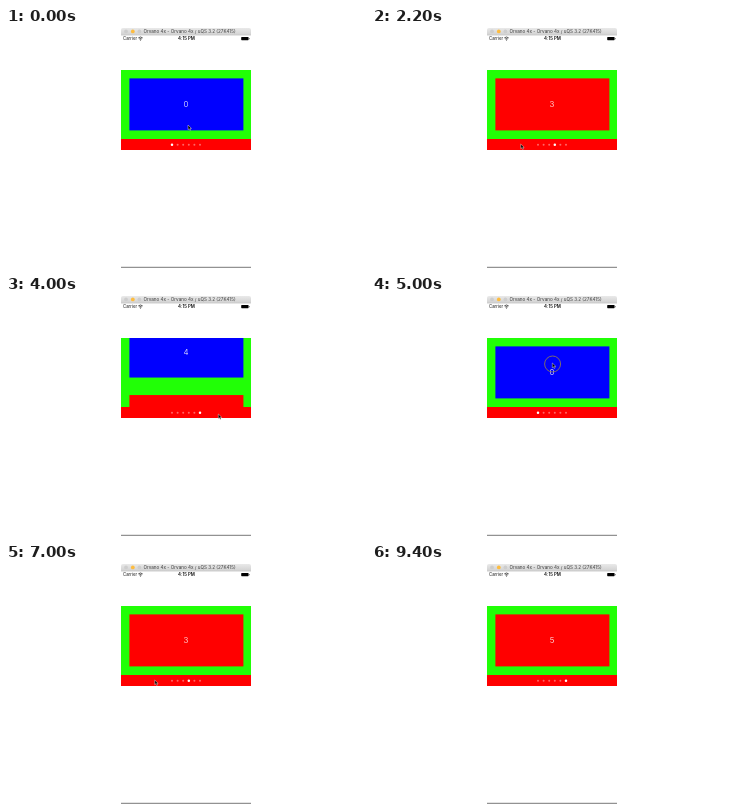
An HTML page for the animation above (9.6 s loop, 360 px wide and 240 px high).

```html
<!DOCTYPE html>
<html lang="en">
<head>
<meta charset="utf-8">
<title>Vertical pager</title>
<style>
  html, body { margin: 0; width: 100%; height: 100%; overflow: hidden; background: #fff; }
  svg { display: block; width: 360px; height: 240px; }
  text { font-family: Inter, "Liberation Sans", sans-serif; }
</style>
</head>
<body>
<svg viewBox="0 0 360 240">
  <defs>
    <linearGradient id="chrome" x2="0" y2="1">
      <stop stop-color="#e9e9e9"/>
      <stop offset="1" stop-color="#d1d1d1"/>
    </linearGradient>
    <clipPath id="view"><rect x="115" y="42" width="130" height="69.3"/></clipPath>
  </defs>

  <path d="M115 7V2q0-2 2-2h126q2 0 2 2v5z" fill="url(#chrome)"/>
  <path d="M115 7.2h130" stroke="#b4b4b4" stroke-width=".5"/>
  <circle cx="120" cy="3.4" r="1.9" fill="#cdcdcd"/>
  <circle cx="126.8" cy="3.4" r="1.9" fill="#fdbc40"/>
  <circle cx="133.4" cy="3.4" r="1.9" fill="#cdcdcd"/>
  <text x="183.5" y="5" font-size="4.6" text-anchor="middle" fill="#3c3c3c">Orvano 4x - Orvano 4x / uQS 3.2 (27K415)</text>

  <text x="117" y="12.3" font-size="4.3" fill="#111">Carrier</text>
  <g fill="none" stroke="#111" stroke-width=".7">
    <path d="M132.3 9.9q2.2-1.8 4.4 0M133.2 11q1.3-1 2.6 0"/>
    <circle cx="134.5" cy="12" r=".25"/>
  </g>
  <text x="180.5" y="12.3" font-size="4.4" font-weight="600" text-anchor="middle" fill="#111">4:15 PM</text>
  <path d="M235.8 9h6.2q.6 0 .6.6v2q0 .6-.6.6h-6.2q-.6 0-.6-.6v-2q0-.6.6-.6zM243 10h.4v1.2h-.4z"/>

  <rect x="115" y="42" width="130" height="69.3" fill="#21ff06"/>
  <g clip-path="url(#view)"><g id="pages"></g></g>
  <rect x="115" y="111" width="130" height="11" fill="#f00"/>
  <g id="dots" fill="#fff"></g>
  <path d="M115 239.3h130" stroke="#777" stroke-width="1"/>

  <g id="cursor">
    <circle id="ring" cx=".3" cy="1" r="8" fill="none" stroke="#9a8748" stroke-width=".8"/>
    <path d="M0 0v4.7l1.1-1 .8 1.8.9-.4-.8-1.7h1.5z" fill="#000" stroke="#fff" stroke-width=".4"/>
  </g>
</svg>
<script>
const LOOP = 4800, STEP = 200, PITCH = 69.5, COUNT = 6;
const SWIPE_END = 8, CURSOR_END = 22;

// [step, page]
const scroll = [[0, 0], [1, 0], [9, 4], [11, 3], [13, 2], [15, 2], [16, 2.335], [17, 3],
  [18, 3.266], [19, 4], [20, 4.3], [21, 5], [24, 5]];
// [step, x, y] once the swipes are over
const pointer = [[9, 148.7, 116], [13, 148.7, 116], [15, 212.3, 118], [20, 212.3, 118], [22, 205, 146]];

const $ = id => document.getElementById(id);

function add(parent, tag, attrs, text = "") {
  const el = document.createElementNS("http://www.w3.org/2000/svg", tag);
  for (const key in attrs) el.setAttribute(key, attrs[key]);
  el.textContent = text;
  return parent.appendChild(el);
}

function sample(keys, s) {
  let i = 1;
  while (i < keys.length - 1 && keys[i][0] < s) i++;
  const a = keys[i - 1], b = keys[i];
  const k = Math.max(0, Math.min(1, (s - a[0]) / (b[0] - a[0])));
  return a.slice(1).map((v, n) => v + (b[n + 1] - v) * k);
}

function cursorAt(s) {
  if (s === 0) return [182, 97];
  if (s <= SWIPE_END) return [180.3, s % 2 ? 67 : 36];
  return sample(pointer, s);
}

// Swipes flip the dot halfway, taps flip it at once.
function dotAt(s, page) {
  if (s <= SWIPE_END) return Math.floor(page);
  return s < 14 ? Math.floor(page) : Math.ceil(page);
}

const dots = [];
for (let i = 0; i < COUNT; i++) {
  const y = i * PITCH;
  add($("pages"), "rect", { x: 123.4, y: 50.4, width: 114, height: 52, fill: i % 2 ? "#f00" : "#00f",
    transform: `translate(0 ${y})` });
  add($("pages"), "text", { x: 180, y: 79.4 + y, "font-size": 8, "font-weight": 300,
    "text-anchor": "middle", fill: "#fff" }, i);
  dots.push(add($("dots"), "circle", { cx: 166 + 5.6 * i, cy: 116.7 }));
}

let last = -1;
function draw(now) {
  const s = Math.floor(now % LOOP / STEP);
  if (s !== last) {
    last = s;
    const [page] = sample(scroll, s);
    const active = dotAt(s, page);
    $("pages").setAttribute("transform", `translate(0 ${-page * PITCH})`);
    dots.forEach((dot, i) => {
      dot.setAttribute("r", i === active ? 1.25 : 1);
      dot.setAttribute("opacity", i === active ? 1 : 0.4);
    });
    $("cursor").setAttribute("transform", `translate(${cursorAt(s)})`);
    $("cursor").setAttribute("visibility", s > CURSOR_END ? "hidden" : "visible");
    $("ring").setAttribute("opacity", s >= 1 && s <= SWIPE_END ? 1 : 0);
  }
  requestAnimationFrame(draw);
}
draw(performance.now());
</script>
</body>
</html>
```
